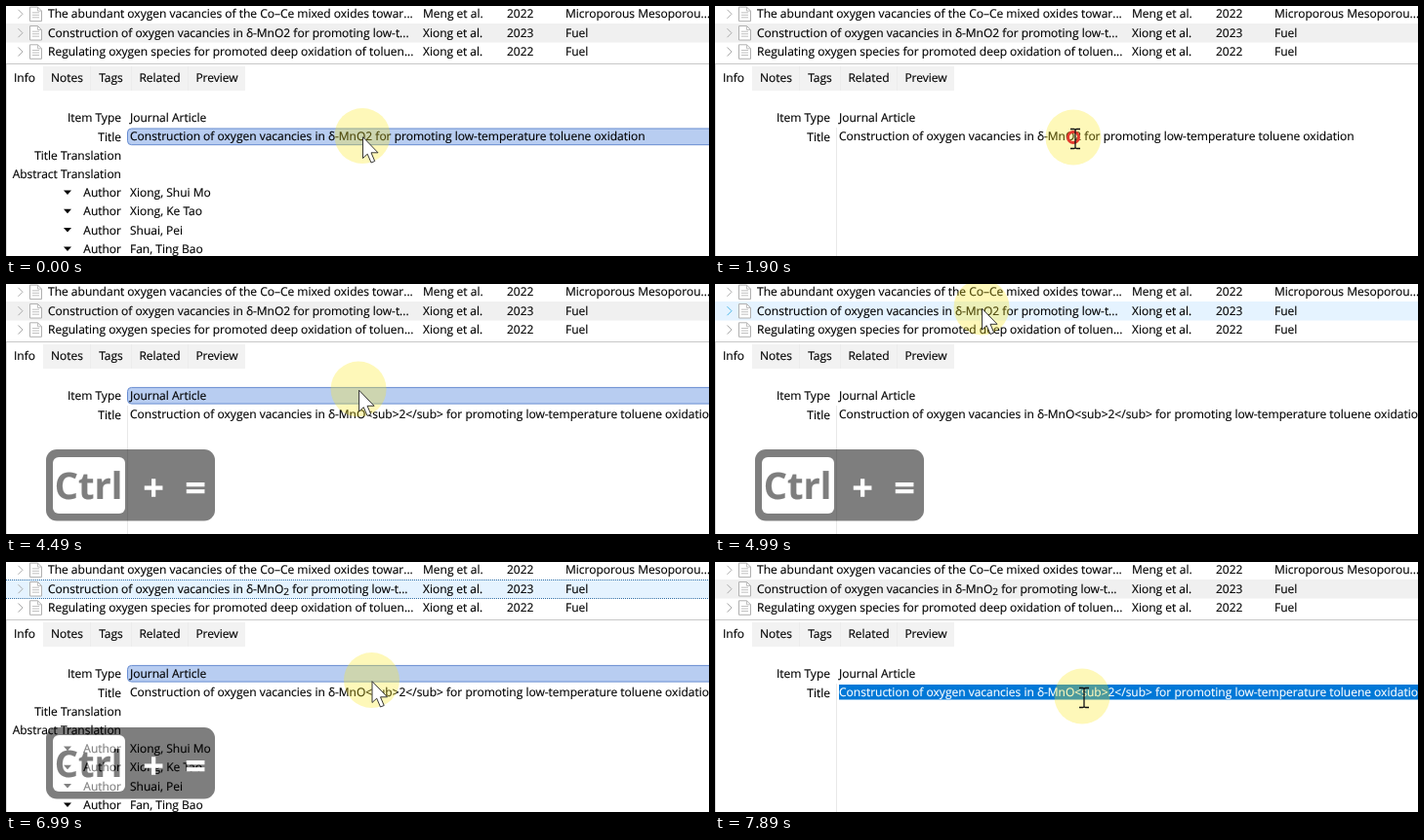
Write an HTML page that moves like this. It is 720 by 257 pixels and loops after 7.99 s.

```html
<!DOCTYPE html>
<html lang="en">
<head>
<meta charset="utf-8">
<title>Subscript in a title field</title>
<style>
html, body { margin: 0; height: 100%; overflow: hidden; background: #fff; }
svg { display: block; width: 100vw; height: 100vh; }
text { font: 12px "Open Sans", "Noto Sans", sans-serif; fill: #000; stroke: #000; stroke-width: .15; text-rendering: geometricPrecision; }
.white { fill: #fff; stroke: #fff; }
.small { font-size: 10px; }
.key { font-size: 38px; font-weight: 700; text-anchor: middle; }
</style>
</head>
<body>
<svg id="stage" viewBox="0 0 720 257"></svg>
<script>
const LOOP = 7990;
const stage = document.getElementById('stage');

// Pointer path: time, x, y
const path = [
  [0, 365, 133.5], [1200, 365, 133.5], [1700, 367, 135], [1900, 367, 135], [2300, 373, 136],
  [4390, 373, 136], [4690, 327, 28], [4790, 327, 28], [4990, 273, 24], [5090, 273, 24],
  [5290, 281, 29], [5590, 281, 29], [5790, 283, 32], [6090, 283, 32], [6890, 374.5, 121.5],
  [6990, 374.5, 121.5], [7190, 375, 137], [7690, 375, 137], [7890, 376, 138]
];
const clicks = [[300, 500], [800, 1000], [1900, 2600], [5390, 5590], [7190, 7390]];

const within = (t, from, to) => t >= from && t < to;
const clamp = v => Math.max(0, Math.min(1, v));
const ease = u => u * u * (3 - 2 * u);

function pointerAt(t) {
  const next = path.findIndex(p => p[0] > t);
  if (next < 0) return path[path.length - 1].slice(1);
  const [t0, x0, y0] = path[next - 1], [t1, x1, y1] = path[next];
  const u = ease((t - t0) / (t1 - t0));
  return [x0 + (x1 - x0) * u, y0 + (y1 - y0) * u];
}

const text = (x, y, content, attrs = '') => `<text x="${x}" y="${y}" ${attrs}>${content}</text>`;
const rect = (x, y, w, h, fill, attrs = '') =>
  `<rect x="${x}" y="${y}" width="${w}" height="${h}" fill="${fill}" ${attrs}/>`;
const line = (d, stroke, attrs = '') => `<path d="${d}" fill="none" stroke="${stroke}" ${attrs}/>`;

function listRow(y, title, author, year, journal, chevron = '#aaa') {
  return line(`M12.5 ${y - 8.5}l4.5 4.5l-4.5 4.5`, chevron) +
    `<path d="M24.5 ${y - 11.2}h8l4 4v10.5h-12z" fill="#fff" stroke="#b0b0b0"/>` +
    line(`M32.5 ${y - 11.2}v4h4M27 ${y - 5.5}h7m-7 2.5h7m-7 2.5h7`, '#b0b0b0', 'stroke-width=".8"') +
    text(43, y, title) + text(427, y, author) + text(513, y, year) + text(573, y, journal);
}

function list(t, hovered) {
  const saved = t >= 5490;
  const focused = within(t, 5490, 7390);
  const two = saved ? '<tspan class="small" dy="2.5">2</tspan><tspan dy="-2.5"> ' : '2<tspan> ';
  return rect(0, 18, 720, 19.5, focused || hovered ? '#e5f3ff' : '#f0f0f0') +
    (focused ? line('M0 18.5H720M0 37.5H720', '#2f6ea5', 'stroke-dasharray="1 1"') : '') +
    listRow(12.3, 'The abundant oxygen vacancies of the Co–Ce mixed oxides towar...', 'Meng et al.', 2022, 'Microporous Mesoporou...') +
    listRow(31.7, `Construction of oxygen vacancies in δ-MnO${two}for promoting low-t...</tspan>`,
      'Xiong et al.', 2023, 'Fuel', hovered ? '#4db8e8' : '#aaa') +
    listRow(51, 'Regulating oxygen species for promoted deep oxidation of toluen...', 'Xiong et al.', 2022, 'Fuel');
}

function tabs() {
  const names = [['Info', 19], ['Notes', 62.5], ['Tags', 107.5], ['Related', 157.5], ['Preview', 216]];
  return line('M0 59.5H720', '#c8c8c8') + line('M.5 60V257', '#ddd') +
    rect(38, 62, 207, 25, '#f2f2f2') +
    line('M86.5 62V87M128.5 62V87M186.5 62V87', '#ececec') +
    names.map(([name, x]) => text(x, 78, name, 'text-anchor="middle"')).join('');
}

function fields(t, y) {
  const editing = within(t, 400, 5490) || t >= 7390;
  const allSelected = within(t, 400, 900) || t >= 7390;
  const digitSelected = within(t, 2200, 3790);
  const label = (name, base) => text(118, base, name, 'text-anchor="end"');
  const highlight = top => rect(124.5, top, 610, 16.7, '#b8cdf1', 'rx="4" stroke="#668bd0"');
  const two = t >= 3790 ? '&lt;sub&gt;2&lt;/sub&gt;' : digitSelected ? '<tspan class="white">2</tspan>' : '2';
  let out = '';

  if (y > 105 && y < 125) out += highlight(106.4);
  if (!editing && y >= 125 && y < 144) out += highlight(126);
  if (editing) out += line('M124.5 125V257', '#e8e8e8');
  if (allSelected) out += rect(127, 126, t < 3790 ? 526 : 593, 15.5, '#0078d7');
  if (digitSelected) out += rect(368, 126, 7, 15.5, '#0078d7');

  out += label('Item Type', 119.3) + text(127, 119.3, 'Journal Article') + label('Title', 138.5) +
    text(127, 138.2, `Construction of oxygen vacancies in δ-MnO${two} for promoting low-temperature toluene oxidation`,
      allSelected ? 'class="white"' : '');

  if (!editing) {
    out += label('Title Translation', 157.8) + label('Abstract Translation', 177);
    ['Xiong, Shui Mo', 'Xiong, Ke Tao', 'Shuai, Pei', 'Fan, Ting Bao'].forEach((name, i) => {
      const base = 196 + i * 19.3;
      out += `<path d="M59 ${base - 6.5}h8l-4 4.5z" fill="#000"/>` + label('Author', base) + text(127, base, name);
    });
  }
  return { out, editing };
}

function keystroke(t) {
  if (t < 3690) return '';
  const opacity = 0.5 * (1 - clamp((t - 7190) / 300));
  return `<g opacity="${opacity}">` + rect(41, 170, 173, 73.5, '#000', 'rx="11"') +
    rect(48, 178, 74, 58, '#fff', 'rx="6"') + text(84.5, 221.3, 'Ctrl', 'class="key"') + '</g>' +
    `<g opacity="${opacity * 2}">` + text(151, 223, '+', 'class="key white"') +
    text(194, 223, '=', 'class="key white"') + '</g>';
}

function pointer(t, x, y, editing) {
  const pressed = clicks.some(([from, to]) => within(t, from, to));
  const shape = editing && y > 125
    ? line('M-3 -8.5h3.5q1.5 0 1.5 1.5q0 -1.5 1.5 -1.5H7M2 -7V10M-3 11.5h3.5q1.5 0 1.5 -1.5q0 1.5 1.5 1.5H7', '#111', 'stroke-width="1.3"')
    : '<path d="M.5 1.2V23L5.2 18.7L9 27.5L12.7 26L9 17.3H16Z" fill="#fff" stroke="#222" stroke-width=".9"/>';
  return `<g transform="translate(${x} ${y})"><circle r="28.5" fill="#fae81a" opacity=".3"/>` +
    (pressed ? '<circle r="5.5" fill="none" stroke="#e23a2e" stroke-width="3"/>' : '') + shape + '</g>';
}

function render(t) {
  const [x, y] = pointerAt(t);
  const pane = fields(t, y);
  stage.innerHTML = rect(0, 0, 720, 257, '#fff') + list(t, y > 18 && y < 38) + tabs() +
    pane.out + keystroke(t) + pointer(t, x, y, pane.editing);
}

// The picture advances in 100 ms steps, ten milliseconds early after the long pause.
function step(t) {
  const shift = t < 3000 ? 0 : 10;
  return Math.floor((t + shift) / 100) * 100 - shift;
}

const start = performance.now();
let shown = -1;
function tick() {
  const t = step((performance.now() - start) % LOOP);
  if (t !== shown) render(shown = t);
  requestAnimationFrame(tick);
}
tick();
</script>
</body>
</html>
```
